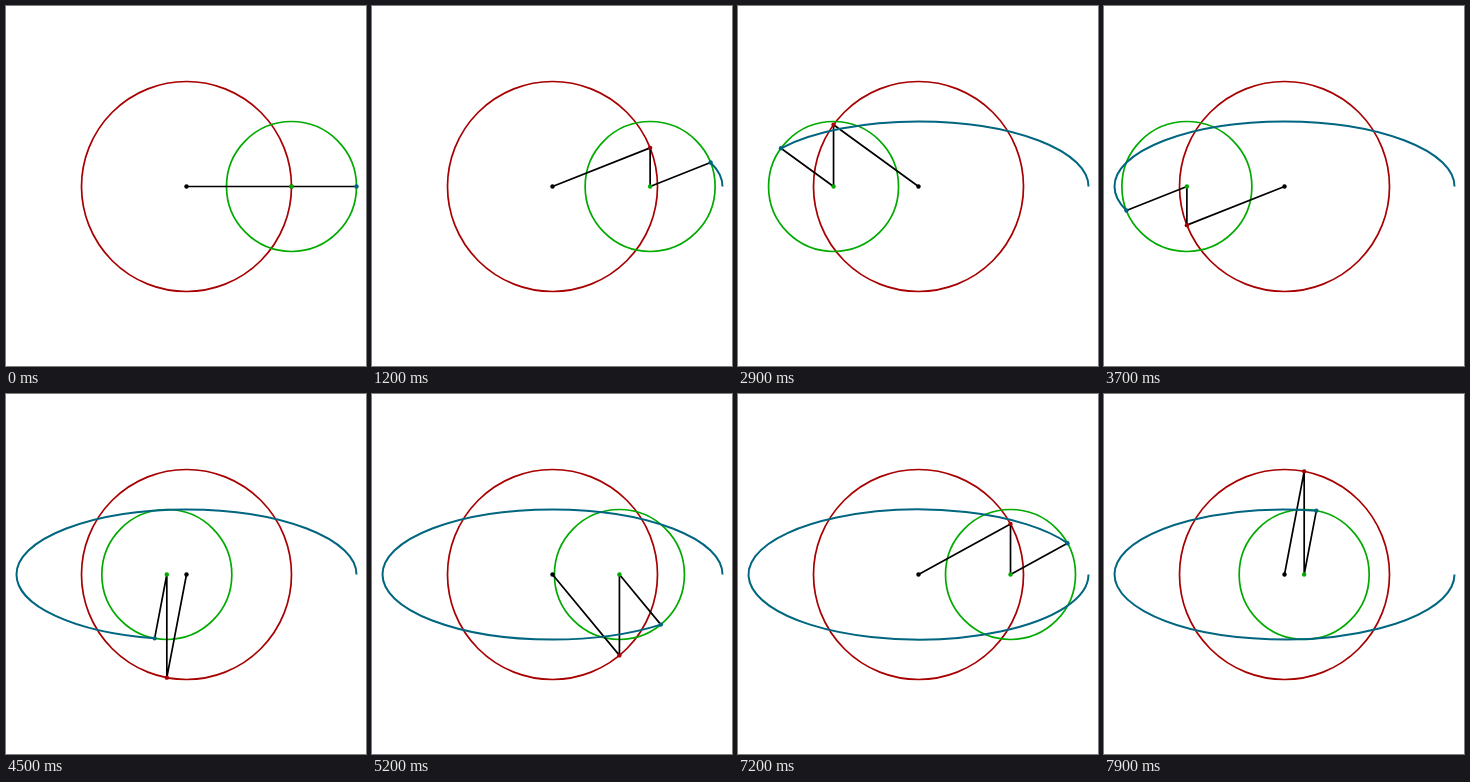
Recreate the animation shown at these times as an HTML page with a canvas. Size 360 by 360 pixels, loop 8000 ms.

```html
<!DOCTYPE html>
<html>
<head>
<meta charset="utf-8">
<style>
html, body { margin: 0; width: 100%; height: 100%; overflow: hidden; background: #fff; }
canvas { display: block; }
</style>
</head>
<body>
<canvas id="stage" width="360" height="360"></canvas>
<script>
const ctx = document.getElementById('stage').getContext('2d');
const LOOP = 8000, STEP = 100, STEPS = 50, TAU = Math.PI * 2;
const C = 180.5, R = 105, r = 65;
const RED = '#a80000', GREEN = '#00aa00', BLUE = '#006680', BLACK = '#000';

function stroke(color, width) {
  ctx.strokeStyle = color;
  ctx.lineWidth = width;
  ctx.stroke();
}

function circle(x, y, radius, color) {
  ctx.beginPath();
  ctx.arc(x, y, radius, 0, TAU);
  stroke(color, 1.7);
}

function dot(x, y, color) {
  ctx.beginPath();
  ctx.arc(x, y, 2.2, 0, TAU);
  ctx.fillStyle = color;
  ctx.fill();
}

// Steps taken since a turn began, the first one at its start.
const stepsSince = (t, start) =>
  Math.max(0, Math.min(STEPS, Math.floor((t - start) / STEP) + 1));

function draw(t) {
  const drawn = stepsSince(t, 1000) / STEPS * TAU;
  const erased = stepsSince(t, 6900) / STEPS * TAU;
  const angle = erased || drawn;
  const cos = Math.cos(angle), sin = Math.sin(angle);
  const px = C + R * cos, py = C - R * sin;
  const ex = C + (R + r) * cos, ey = C - r * sin;

  ctx.fillStyle = '#fff';
  ctx.fillRect(0, 0, 360, 360);
  circle(C, C, R, RED);
  circle(px, C, r, GREEN);

  ctx.lineJoin = 'round';
  ctx.beginPath();
  ctx.moveTo(C, C);
  ctx.lineTo(px, py);
  ctx.lineTo(px, C);
  ctx.lineTo(ex, ey);
  stroke(BLACK, 1.7);

  if (drawn > erased) {
    ctx.beginPath();
    ctx.ellipse(C, C, R + r, r, 0, -erased, -drawn, true);
    stroke(BLUE, 2);
  }

  dot(C, C, BLACK);
  dot(px, py, RED);
  dot(px, C, GREEN);
  dot(ex, ey, BLUE);
}

const begin = performance.now();
function tick() {
  draw((performance.now() - begin) % LOOP);
  requestAnimationFrame(tick);
}
tick();
</script>
</body>
</html>
```
